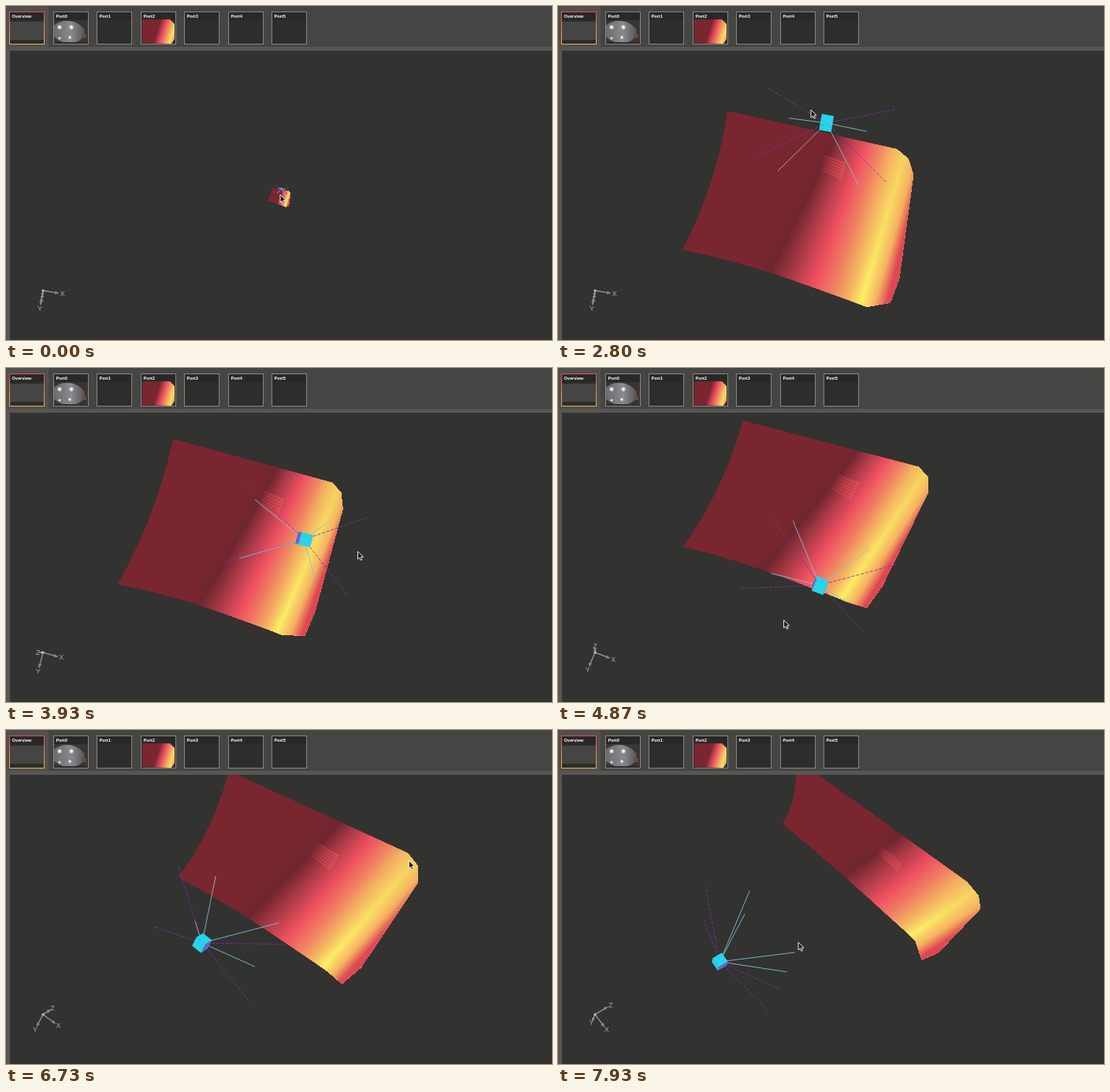
Animation, 693 px wide and 425 px high, one loop 8000 ms. Source, as an HTML page with a canvas:

```html
<!DOCTYPE html>
<html lang="en">
<head>
<meta charset="utf-8">
<title>Depth surface viewer</title>
<style>
html, body { margin: 0; width: 100%; height: 100%; overflow: hidden; background: #323231; }
canvas { display: block; width: 693px; height: 425px; }
</style>
</head>
<body>
<canvas id="stage" width="693" height="425"></canvas>
<script>
const ctx = document.getElementById('stage').getContext('2d');
const LOOP = 8000, STEP = 200 / 3;
const CENTER = [332, 218], ZOOM_AT = [351, 241.5], DISTANCE = 900;

// Scene in sensor space: x right, y down, z away from the sensor.
const SENSOR_Z = -150, CUBE = 6.5;
const NEAR = { z: -79, w: 47, h: 35 }, FAR = { z: -124, w: 75, h: 46 };

// [ms, view axis x, view axis y, roll in degrees, easing power towards the next key]
const ORBIT = [
  [2800, -.05, .39, 10, 1],
  [3930, -.26, 0, 15, 1],
  [4870, 0, -.33, 22, 3],
  [6700, .47, -.3, 32, 1],
  [7930, .79, -.48, 43.5, 1]
];
const ZOOM = [[0, .098], [270, .1], [1000, .18], [1200, .29], [1930, 1]].map(([t, s]) => [t, Math.log(s)]);
const POINTER = [[0, 348, 240], [1200, 339, 241], [2000, 338, 240], [2800, 321, 132], [3930, 447, 233],
  [4870, 286, 321], [5500, 110, 312], [6500, 512, 166], [6730, 512, 166], [7930, 305, 270]];

// Colour lines across the sheet: u on the top edge, u on the bottom edge, colour.
const HEAT = [
  [-1.3, -1.3, [122, 38, 46]], [-.03, -.37, [122, 38, 46]], [.11, -.22, [110, 38, 46]],
  [.26, 0, [176, 60, 73]], [.43, .2, [238, 80, 96]], [.6, .4, [240, 132, 97]],
  [.73, .54, [244, 180, 97]], [.87, .67, [246, 211, 97], [251, 240, 102]],
  [1, .8, [245, 176, 97]], [1.09, .9, [222, 72, 84]], [1.5, 1.4, [190, 54, 68]]
];

const mix = (a, b, k) => a + (b - a) * k;
const mixAll = (a, b, k) => a.map((v, i) => mix(v, b[i], k));
const rgb = c => `rgb(${c.map(Math.round)})`;
const range = (n, f) => Array.from({ length: n }, (_, i) => f(i));

function track(keys, t, power = () => 1) {
  const i = keys.findIndex(k => k[0] > t);
  if (i === 0) return keys[0].slice(1);
  if (i < 0) return keys[keys.length - 1].slice(1);
  const a = keys[i - 1], b = keys[i], k = (t - a[0]) / (b[0] - a[0]);
  return mixAll(a, b, 1 - (1 - k) ** power(a)).slice(1);
}

// Rotation that tips the z axis to (zx, zy) after a roll about it.
function rotation(zx, zy, roll) {
  const c = Math.cos(roll * Math.PI / 180), s = Math.sin(roll * Math.PI / 180);
  const zz = Math.sqrt(1 - zx * zx - zy * zy), k = 1 / (1 + zz);
  return ([x, y, z]) => {
    const a = x * c - y * s, b = x * s + y * c, d = (a * zx + b * zy) * k;
    return [a - d * zx + z * zx, b - d * zy + z * zy, z * zz - a * zx - b * zy];
  };
}

function projection(turn, scale) {
  return p => {
    const [x, y, z] = turn(p), m = DISTANCE / (DISTANCE + z);
    return mixAll(ZOOM_AT, [CENTER[0] + x * m, CENTER[1] + y * m], scale);
  };
}

// Scanned sheet, u and v from -1 to 1; the lower right end curls towards the sensor.
function sheet(u, v) {
  const curl = 24 * Math.min(1, Math.max(0, (u - .74) / .2)) * Math.max(0, (v + 1) / 2) ** 3;
  return [-10 + 142 * u - 5 * v + 4 * u * v, 4 + 110 * v + 10 * u * v, 97 + 36 * u + 12 * v - curl];
}

const OUTLINE = [
  [-1, -1], [.78, -1], [.92, -.91], [1, -.72], [1, .6], [.94, .92], [.74, 1],
  ...range(12, i => mix(.6, -1, i / 11)).map(u => [u, 1 - .045 * (1 - u * u) * (1 - u)]),
  ...range(9, i => mix(.8, -.8, i / 8)).map(v => [-1 + .055 * (1 - v * v), v])
];

function trace(pts) {
  ctx.beginPath();
  pts.forEach(p => ctx.lineTo(p[0], p[1]));
  ctx.closePath();
}

function fillShape(pts, color) {
  trace(pts);
  ctx.fillStyle = color;
  ctx.fill();
}

function line(a, b, color, width = 1, dash = []) {
  ctx.setLineDash(dash);
  ctx.strokeStyle = color;
  ctx.lineWidth = width;
  ctx.beginPath();
  ctx.moveTo(a[0], a[1]);
  ctx.lineTo(b[0], b[1]);
  ctx.stroke();
  ctx.setLineDash([]);
}

function rect(color, x, y, w, h) {
  ctx.fillStyle = color;
  ctx.fillRect(x, y, w, h);
}

function clipTo(pts) {
  ctx.save();
  trace(pts);
  ctx.clip();
}

function drawSheet(project) {
  const at = (u, v) => project(sheet(u, v));
  const across = (top, bottom) => range(9, i => {
    const v = mix(-1.2, 1.2, i / 8);
    return at(mix(top, bottom, (v + 1) / 2), v);
  });
  const end = across(1.6, 1.6).reverse();
  clipTo(OUTLINE.map(([u, v]) => at(u, v)));
  HEAT.slice(1).forEach((b, i) => {
    const a = HEAT[i];
    for (let k = 0; k < 1; k += 1 / 12) {
      const edge = across(mix(a[0], b[0], k), mix(a[1], b[1], k));
      const fill = ctx.createLinearGradient(...edge[1], ...edge[7]);
      fill.addColorStop(0, rgb(mixAll(a[2], b[2], k)));
      fill.addColorStop(1, rgb(mixAll(a[3] || a[2], b[3] || b[2], k)));
      fillShape([...edge, ...end], fill);
    }
  });
  ctx.restore();
}

function drawBump(project) {
  const at = (u, v) => {
    const [x, y, z] = sheet(u, v);
    return project([x, y, z - 10]);
  };
  const left = k => at(.02, mix(-.67, -.47, k)), right = k => at(.265, mix(-.64, -.39, k));
  const top = right(0), bottom = right(1);
  const width = Math.hypot(top[0] - bottom[0], top[1] - bottom[1]) / 10;
  for (let k = .08; k < 1; k += .17) {
    const from = left(k), to = right(k);
    const fade = ctx.createLinearGradient(...from, ...to);
    fade.addColorStop(0, 'rgba(190,60,70,0)');
    fade.addColorStop(.5, 'rgba(200,64,74,.75)');
    fade.addColorStop(1, 'rgba(224,80,88,.85)');
    line(from, to, fade, width);
  }
  line(top, bottom, 'rgba(240,130,105,.5)', width / 3);
}

function drawSensor(project, turn) {
  const eye = project([0, 0, SENSOR_Z]);
  const rays = ({ z, w, h }, color, dash) => [-1, 1].forEach(x => [-1, 1].forEach(y =>
    line(eye, project([x * w, y * h, z]), color, 1, dash)));
  rays(FAR, 'rgba(134,45,170,.85)', [4, 2]);
  rays(NEAR, 'rgba(132,196,214,.85)');
  for (let axis = 0; axis < 3; axis++) {
    for (const side of [-1, 1]) {
      const corner = (a, b) => {
        const p = [0, 0, SENSOR_Z];
        [side, a, b].forEach((v, i) => p[(axis + i) % 3] += v * CUBE);
        return p;
      };
      const normal = range(3, i => i === axis ? side : 0);
      if (turn(normal)[2] > 0) continue;
      const face = [corner(-1, -1), corner(1, -1), corner(1, 1), corner(-1, 1)].map(project);
      fillShape(face, axis ? '#29d3e9' : '#6a62cf');
    }
  }
}

function drawAxes(turn) {
  const o = [47, 362], gray = '#8c8c8b';
  ctx.font = '9px "Liberation Sans", Arial, sans-serif';
  ctx.textAlign = 'center';
  ctx.textBaseline = 'middle';
  ['X', 'Y', 'Z'].forEach((name, axis) => {
    const [dx, dy] = turn(range(3, i => i === axis ? 1 : 0));
    const along = r => [o[0] + dx * r, o[1] + dy * r];
    const tip = along(20), label = along(25), ang = Math.atan2(dy, dx);
    const wing = s => [tip[0] - 5 * Math.cos(ang + s), tip[1] - 5 * Math.sin(ang + s)];
    line(o, tip, gray, 1.5);
    fillShape([tip, wing(.45), wing(-.45)], gray);
    ctx.fillStyle = '#a9a9a8';
    ctx.fillText(name, label[0], label[1] + .5);
  });
  ctx.fillStyle = '#c4c4c2';
  ctx.beginPath();
  ctx.arc(o[0], o[1], 1.6, 0, 7);
  ctx.fill();
}

function drawPointer([x, y]) {
  const arrow = [[0, 0], [0, 10], [2.3, 8], [3.9, 11.3], [5.6, 10.5], [4, 7.3], [7, 7]];
  fillShape(arrow.map(p => [p[0] + x, p[1] + y]), '#1c1c1c');
  ctx.strokeStyle = '#e8e8e8';
  ctx.lineWidth = 1;
  ctx.stroke();
}

function glow(x, y, r) {
  const g = ctx.createRadialGradient(x, y, 0, x, y, r);
  g.addColorStop(.2, '#fff');
  g.addColorStop(1, 'rgba(255,255,255,0)');
  rect(g, x - r, y - r, 2 * r, 2 * r);
}

function drawRoom() {
  clipTo([[61, 18], [104, 18], [104, 46], [61, 46]]);
  rect('#393534', 61, 18, 43, 28);
  const wall = ctx.createLinearGradient(61, 0, 104, 0);
  wall.addColorStop(0, '#696b6d');
  wall.addColorStop(.5, '#888b8e');
  wall.addColorStop(1, '#4a4747');
  ctx.fillStyle = wall;
  ctx.beginPath();
  ctx.ellipse(79, 33, 21, 14, .1, 0, 7);
  ctx.fill();
  rect('#6b4a3c', 97, 36, 5, 5);
  [[68, 27, 3.5], [83, 27, 3.5], [81, 40, 2.5], [68, 41, 2]].forEach(g => glow(...g));
  ctx.restore();
}

function drawHeatThumb() {
  const heat = ctx.createLinearGradient(176, 26, 214, 38);
  [[.42, '#7a262e'], [.62, '#ee5060'], [.78, '#f2a061'], [.92, '#f9e064'], [1, '#f0a05e']]
    .forEach(([k, color]) => heat.addColorStop(k, color));
  fillShape([[173, 17], [208, 17], [214, 23], [214, 42], [210, 48], [173, 47]], heat);
}

function drawHeader() {
  rect('#454544', 0, 0, 693, 52);
  rect('#50504e', 0, 0, 54, 52);
  rect('#565654', 0, 52, 693, 5);
  rect('#565654', 0, 52, 5, 373);
  ctx.font = 'bold 5.6px "Liberation Sans", Arial, sans-serif';
  ctx.textAlign = 'left';
  ctx.textBaseline = 'alphabetic';
  for (let i = 0; i < 7; i++) {
    const x = Math.round(4.4 + i * 55.5);
    rect('#2d2d2c', x, 8, 44, 40);
    rect('#282827', x, 8, 44, 10);
    let edge = '#858584';
    if (!i) {
      rect('#454544', x, 20, 44, 23);
      edge = ctx.createLinearGradient(0, 8, 0, 48);
      edge.addColorStop(0, '#e44e60');
      edge.addColorStop(1, '#eeb043');
    }
    if (i === 1) drawRoom();
    if (i === 3) drawHeatThumb();
    ctx.strokeStyle = edge;
    ctx.lineWidth = 1;
    ctx.strokeRect(x + .5, 7.5, 44, 41);
    ctx.fillStyle = '#fff';
    ctx.fillText(i ? 'Port' + (i - 1) : 'Overview', x + 3.5, 15);
  }
}

function draw(t) {
  const [zx, zy, roll] = track(ORBIT, t, key => key[4]);
  const turn = rotation(zx, zy, roll);
  const project = projection(turn, Math.exp(track(ZOOM, t)[0]));
  rect('#323231', 0, 0, 693, 425);
  drawHeader();
  clipTo([[5, 57], [693, 57], [693, 425], [5, 425]]);
  drawSheet(project);
  drawBump(project);
  drawSensor(project, turn);
  drawAxes(turn);
  drawPointer(track(POINTER, t));
  ctx.restore();
}

const start = performance.now();
function tick() {
  const t = (performance.now() - start) % LOOP;
  draw(Math.floor((t + 5) / STEP) * STEP);
  requestAnimationFrame(tick);
}
tick();
</script>
</body>
</html>
```
